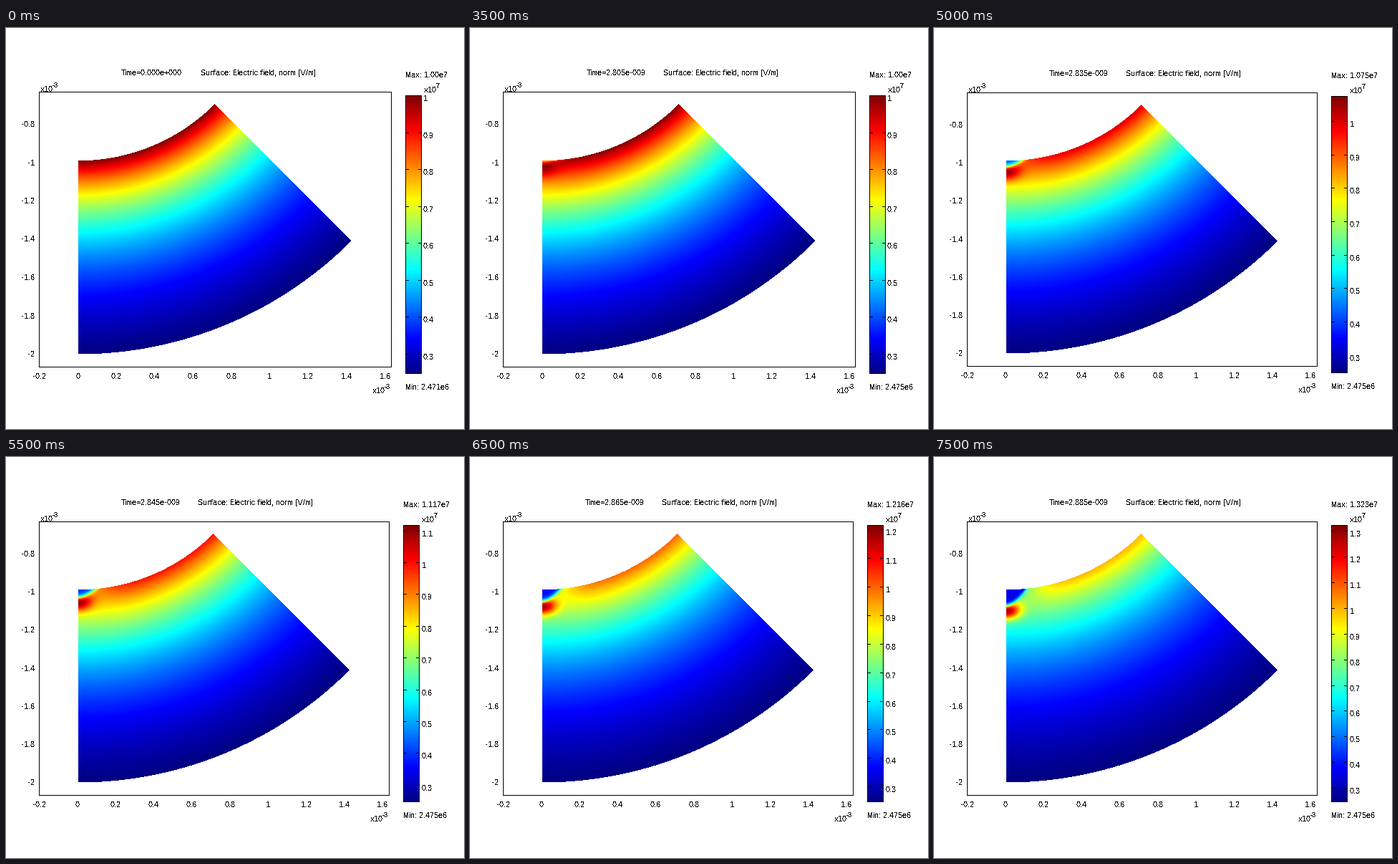
Write a matplotlib script that moves like this. It is 640 px wide and 560 px high and loops after 8000 ms.

```python
import numpy as np
import matplotlib.pyplot as plt
from matplotlib.animation import FuncAnimation

W, H, DPI = 640, 560, 64
FRAMES, STEP = 16, 500
PX = 72 / DPI

plt.rcParams.update({
    "font.family": "Liberation Sans",
    "text.antialiased": False,
    "text.hinting": "no_autohint",
    "text.hinting_factor": 1,
})

# Screen geometry before and after the colour scale starts to grow
WIDE = dict(box=(46, 89, 538, 473), bar=(558, 94, 580, 482),
            cy=-84.0, ri=269.3, ro=539.5, dx=53.65, dy=53.5, ytop=134,
            xlab=486, title=62, mid=296.5, exp_x=512, exp_y=506,
            scale_x=584, top=85, tick_x=583, max_y=65, min_y=501)
NARROW = dict(box=(46, 90, 535, 472), bar=(555, 95, 577, 481),
              cy=-81.7, ri=267.0, ro=536.2, dx=53.25, dy=53.2, ytop=135,
              xlab=485, title=63, mid=294.5, exp_x=509, exp_y=505,
              scale_x=581, top=86, tick_x=581, max_y=66, min_y=500)
CX = 101

# Growth of the discharge channel, in pixels and units of 1e7 V/m
KEYS = [3, 5, 7, 9, 11, 13, 15]
CURVES = dict(
    length=[0, 0.8, 2.5, 6, 10.5, 16, 22],
    width=[14, 16, 18, 21, 23, 25, 28],
    inner=[1.0, 0.92, 0.72, 0.46, 0.40, 0.38, 0.36],
    head=[4, 7, 10, 13, 17.5, 23, 29],
    shade=[0, 0.01, 0.03, 0.08, 0.16, 0.25, 0.33],
)
PEAK = ([7, 8, 9, 10, 11, 12, 13, 14, 15],
        [1.0, 1.007, 1.038, 1.075, 1.117, 1.165, 1.216, 1.269, 1.323])

X, Y = np.meshgrid(np.arange(W) + 0.5, np.arange(H) + 0.5)


def jet(v):
    v = np.clip(v, 0, 1)[..., None]
    return np.clip(1.5 - np.abs(4 * v - np.array([3, 2, 1])), 0, 1)


def field(i, lay, peak, low):
    ri, ro = lay["ri"], lay["ro"]
    u = X - CX
    d = np.hypot(u, Y - lay["cy"]) - ri
    inside = (u > 0) & (d >= 0) & (d <= ro - ri) & (u <= Y - lay["cy"])
    power = np.log(1 / low) / np.log(ro / ri)
    k = {name: np.interp(i, KEYS, vals) for name, vals in CURVES.items()}

    def background(u, d):
        e = (1 + np.maximum(d, 0) / ri) ** -power
        return e * (1 - k["shade"] * np.exp(-(u / 45) ** 2 - d / 20))

    e = background(u, np.maximum(d, 0))
    if i >= 2:
        amp = (peak - background(0, k["head"])) * np.clip((i - 2) / 4, 0, 1)
        e += amp * np.exp(-((d - k["head"]) / 12) ** 2 - (u / 19) ** 2)
        edge = k["length"] * (1 - np.abs(u / k["width"]) ** 1.6)
        q = 1 / (1 + np.exp(np.clip((d - edge) / 2.0, -50, 50)))
        q *= np.clip((i - 2) / 3, 0, 1)
        e += (np.minimum(k["inner"], e) - e) * q
    return inside, e


def frame_box(img, x0, y0, x1, y1):
    img[[y0, y1], x0:x1 + 1] = 0
    img[y0:y1 + 1, [x0, x1]] = 0


def paint(i, lay, peak, low):
    img = np.ones((H, W, 3))
    frame_box(img, *lay["box"])
    inside, e = field(i, lay, peak, low)
    img[inside] = jet((e[inside] - low) / (peak - low))

    x0, y0, x1, y1 = lay["bar"]
    ramp = jet(np.linspace(1, 0, y1 - y0 + 1))
    img[y0:y1 + 1, x0:x1 + 1] = ramp[:, None]
    frame_box(img, x0, y0, x1, y1)
    for _, y in bar_ticks(lay, peak, low):
        row = int(round(y))
        img[row, x0:x0 + 5] = 0
        img[row, x1 - 4:x1 + 1] = 0
    return img


def bar_ticks(lay, peak, low):
    _, y0, _, y1 = lay["bar"]
    for n in range(3, int(peak * 10 + 1e-6) + 1):
        yield n / 10, y0 + (peak - n / 10) / (peak - low) * (y1 - y0)


fig = plt.figure(figsize=(W / DPI, H / DPI), dpi=DPI, facecolor="white")
ax = fig.add_axes([0, 0, 1, 1])
ax.axis("off")
image = ax.imshow(np.ones((H, W, 3)), extent=(0, W, H, 0),
                  aspect="auto", interpolation="nearest")
ax.set_xlim(0, W)
ax.set_ylim(H, 0)


def label(x, y, s, ha="left", size=11):
    ax.text(x, y + 4, s, ha=ha, va="baseline", fontsize=size * PX, color="black")


def power_of_ten(x, y, exponent):
    label(x, y, "x10")
    label(x + 17, y - 6, exponent, size=9)


def draw(i):
    lay = WIDE if i < 8 else NARROW
    peak = np.interp(i, *PEAK)
    low = 0.2471 if i == 0 else 0.2475
    image.set_data(paint(i, lay, peak, low))
    for t in list(ax.texts):
        t.remove()

    time = f"{2.735 + 0.01 * i:.3f}e-009" if i else "0.000e+000"
    half = 133.5 if i else 135.5
    label(lay["mid"] - half, lay["title"], f"Time={time}")
    label(lay["mid"] + half + 1, lay["title"],
          "Surface: Electric field, norm [V/m]", ha="right")

    for n in range(10):
        label(46.5 + n * lay["dx"], lay["xlab"], f"{(n - 1) / 5:g}", ha="center")
    for n in range(7):
        label(40, lay["ytop"] + n * lay["dy"], f"{-0.8 - n / 5:.2g}", ha="right")
    power_of_ten(48, lay["top"], "-3")
    power_of_ten(lay["exp_x"], lay["exp_y"], "-3")
    power_of_ten(lay["scale_x"], lay["top"] + 1, "7")

    for value, y in bar_ticks(lay, peak, low):
        label(lay["tick_x"], y + 4, f"{value:g}")
    top = "1.00" if i < 8 else f"{peak:.3f}"
    label(lay["bar"][0], lay["max_y"], f"Max: {top}e7")
    label(lay["bar"][0], lay["min_y"], f"Min: {low * 10:.3f}e6")
    return [image, *ax.texts]


anim = FuncAnimation(fig, draw, frames=FRAMES, interval=STEP,
                     repeat=True, repeat_delay=0, blit=False)
plt.show()
```
